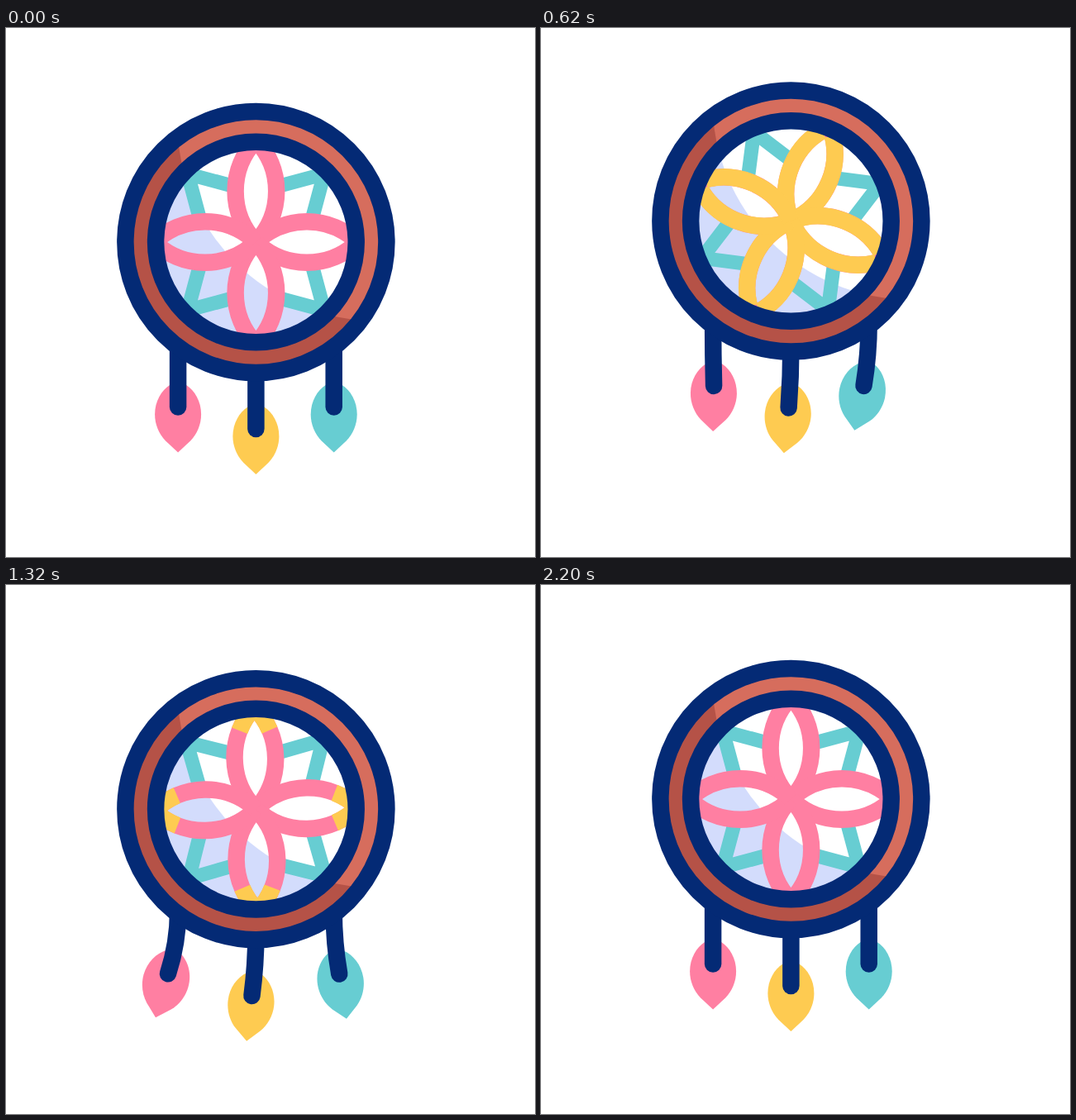
Animation, 640 px wide and 640 px high, one loop 2.48 s. Source, as an HTML page:

```html
<!DOCTYPE html>
<html lang="en">
<head>
<meta charset="utf-8">
<title>Dreamcatcher</title>
<style>
  html, body { margin: 0; width: 100%; height: 100%; overflow: hidden; background: #fff; }
  svg { display: block; width: 100vw; height: 100vh; }
  .line { fill: none; stroke: #042a75; stroke-width: 20.5; stroke-linecap: round; }
  .web { fill: none; stroke: #67cdd2; stroke-width: 17; }
  .petals { fill: none; stroke-width: 20.5; }
</style>
</head>
<body>
<svg viewBox="0 0 640 640">
  <defs>
    <clipPath id="lit"><circle cx="145" cy="-145" r="240"/></clipPath>
    <clipPath id="hole"><circle r="116"/></clipPath>
    <g id="petal">
      <path pathLength="1" d="M0 0A88.9 88.9 0 0 1 0 -123.2"/>
      <path pathLength="1" d="M0 0A88.9 88.9 0 0 0 0 -123.2"/>
    </g>
    <g id="flower">
      <use href="#petal"/>
      <use href="#petal" transform="rotate(90)"/>
      <use href="#petal" transform="rotate(180)"/>
      <use href="#petal" transform="rotate(270)"/>
    </g>
    <path id="corner" d="M24 -66.8L82.5 -82.5L66.8 -24"/>
    <path id="feather" d="M0 55L-15 41C-23 33 -28 21 -28 9C-28 -7 -20 -20 -10 -26.5C-4 -30 4 -30 10 -26.5C20 -20 28 -7 28 9C28 21 23 33 15 41Z"/>
  </defs>
  <g id="catcher">
    <g id="strands"></g>
    <circle r="150" fill="#b55247"/>
    <circle r="150" fill="#d66d5d" clip-path="url(#lit)"/>
    <circle r="121" fill="#d3dcfc"/>
    <circle r="121" fill="#fff" clip-path="url(#lit)"/>
    <g clip-path="url(#hole)">
      <g id="pattern">
        <g class="web">
          <use href="#corner"/>
          <use href="#corner" transform="rotate(90)"/>
          <use href="#corner" transform="rotate(180)"/>
          <use href="#corner" transform="rotate(270)"/>
        </g>
        <use href="#flower" class="petals" stroke="#ff7fa2"/>
        <use href="#flower" class="petals" stroke="#fecb51" id="glow"/>
      </g>
    </g>
    <circle class="line" r="158"/>
    <circle class="line" r="121.3"/>
  </g>
</svg>
<script>
const LOOP = 2480, STEP = 20, LAG = 60, ROPE = 76;
const SVG = 'http://www.w3.org/2000/svg';
const $ = id => document.getElementById(id);

// Smooth curve through [time, value] keys, flat at every peak.
function curve(keys) {
  const rise = i => (keys[i + 1][1] - keys[i][1]) / (keys[i + 1][0] - keys[i][0]);
  const slope = keys.map((k, i) => {
    if (!i || i === keys.length - 1) return 0;
    const a = rise(i - 1), b = rise(i);
    return a * b > 0 ? 2 * a * b / (a + b) : 0;
  });
  return t => {
    if (t <= keys[0][0]) return keys[0][1];
    const i = keys.findIndex(k => k[0] > t) - 1;
    if (i < 0) return keys[keys.length - 1][1];
    const [t0, v0] = keys[i], [t1, v1] = keys[i + 1];
    const d = t1 - t0, u = (t - t0) / d, w = 1 - u;
    return v0 * w * w * (1 + 2 * u) + v1 * u * u * (3 - 2 * u)
      + d * u * w * (slope[i] * w - slope[i + 1] * u);
  };
}

const height = curve([[200, 259], [335, 282.5], [620, 233.5], [740, 221.5], [820, 218],
  [940, 214.5], [1120, 226], [1290, 272.5], [1540, 239], [1820, 259]]);
const turn = curve([[200, 0], [330, -4], [620, 22.4], [820, 26.8], [880, 27.5],
  [1120, 12.7], [1420, -4], [1520, -2.3], [1750, 0]]);
const bend = curve([[200, 0], [260, -2], [320, -7.5], [400, -12], [500, -9.3], [560, -4.2],
  [620, 1.5], [700, 13.7], [760, 17], [820, 19.7], [1030, 25.7], [1120, 24.4],
  [1330, -18], [1400, -15], [1460, -2], [1520, 9], [1600, 14], [1770, -7], [1930, 3], [2070, 0]]);
const sway = curve([[200, 0], [260, -3.2], [320, -11.8], [400, -16.5], [500, -11.7], [560, -6],
  [620, -1], [700, 12], [760, 16], [820, 19.6], [1000, 26], [1060, 27], [1120, 24.4],
  [1330, -16], [1400, -10.2], [1460, 4.4], [1520, 16.2], [1590, 20], [1760, -9], [1920, 3.5], [2070, 0]]);
const grow = curve([[340, 0], [680, 1]]);
const fade = curve([[1090, 0], [1430, 1]]);

function add(tag, attrs) {
  const el = document.createElementNS(SVG, tag);
  for (const name in attrs) el.setAttribute(name, attrs[name]);
  return $('strands').appendChild(el);
}

const strands = [[-94.3, 123.5, '#ff7fa2'], [0, 150, '#fecb51'], [94.3, 123.5, '#67cdd2']]
  .map(([x, y, fill]) => ({
    x, y,
    feather: add('use', { href: '#feather', fill }),
    rope: add('path', { class: 'line' })
  }));

function draw(t) {
  $('catcher').setAttribute('transform', `translate(302.4 ${height(t)})`);
  $('pattern').setAttribute('transform', `rotate(${turn(t)})`);

  const from = fade(t), to = grow(t);
  $('glow').setAttribute('stroke-dasharray', `0 ${from} ${to - from} 2`);
  $('glow').setAttribute('visibility', to > from ? 'visible' : 'hidden');

  strands.forEach(({ x, y, feather, rope }, i) => {
    const time = t - i * LAG;
    const a = bend(time) * Math.PI / 180;
    const endX = x + ROPE / 2 * Math.tan(a);
    const endY = y + ROPE - 4 * a * a;
    rope.setAttribute('d', `M${x} ${y}Q${x} ${y + ROPE / 2} ${endX} ${endY}`);
    feather.setAttribute('transform', `translate(${endX} ${endY}) rotate(${-sway(time)})`);
  });
}

const start = performance.now();
function tick() {
  const t = (performance.now() - start) % LOOP;
  draw(Math.floor(t / STEP) * STEP);
  requestAnimationFrame(tick);
}
tick();
</script>
</body>
</html>
```
